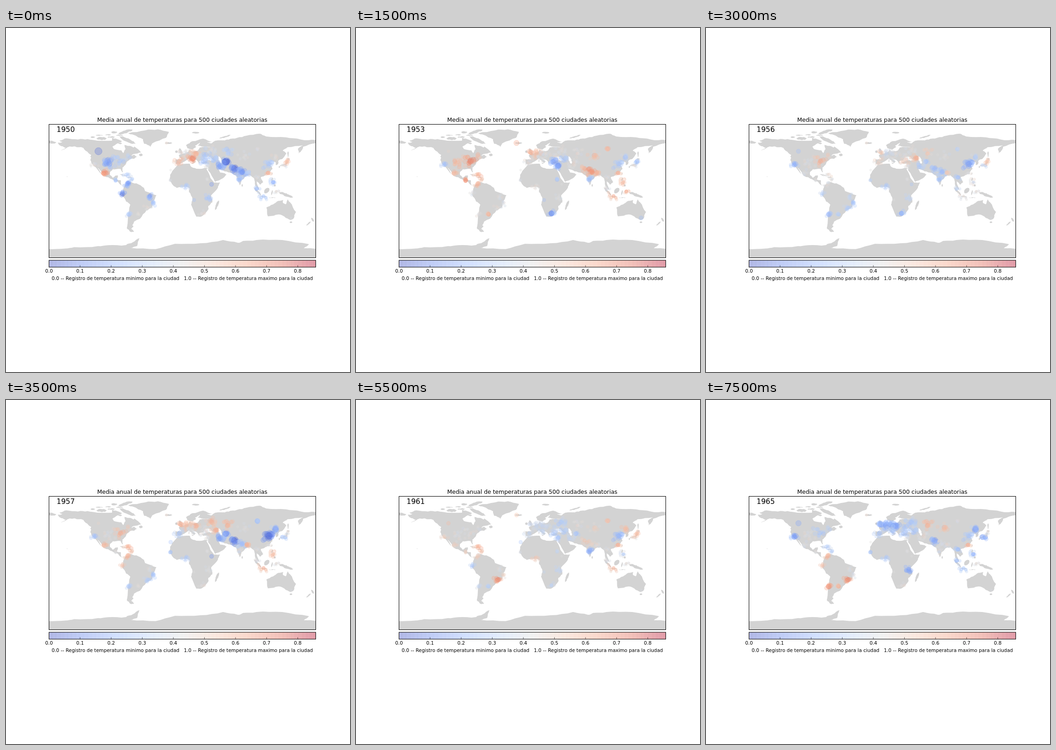
Animation of 748 by 748 pixels, one loop 8000 ms. Source, as an HTML page:

```html
<!DOCTYPE html>
<html lang="es">
<head>
<meta charset="utf-8">
<title>Media anual de temperaturas</title>
<style>
html, body { margin: 0; width: 100%; height: 100%; overflow: hidden; background: #fff; }
svg { display: block; width: 100%; height: 100%; }
text { font: 10.39px "DejaVu Sans", sans-serif; white-space: pre; }
#title { font-size: 12.47px; }
#year { font-size: 15.58px; }
.mid text, .mid { text-anchor: middle; }
.frame { fill: none; stroke: #000; stroke-width: 1.04; }
</style>
</head>
<body>
<svg viewBox="0 0 748 748">
  <clipPath id="box"><rect x="93.5" y="209.5" width="580" height="290"/></clipPath>
  <g clip-path="url(#box)">
    <g id="land" fill="#d3d3d3" transform="translate(383.4 354.8) scale(1.6103 -1.6103)"></g>
    <g id="dots" fill-opacity=".3" stroke-opacity=".3"></g>
  </g>
  <rect class="frame" x="93.5" y="209.5" width="580" height="290"/>
  <g id="bar"></g>
  <rect class="frame" x="93.5" y="505" width="580" height="15"/>
  <g id="ticks" class="mid"></g>
  <text id="title" class="mid" x="383.3" y="204">Media anual de temperaturas para 500 ciudades aleatorias</text>
  <text id="year" x="110" y="226">1950</text>
  <text class="mid" x="383.3" y="548">0.0 -- Registro de temperatura minimo para la ciudad   1.0 -- Registro de temperatura maximo para la ciudad</text>
</svg>
<script>
const $ = id => document.getElementById(id);

function add(parent, tag, attrs) {
  const el = document.createElementNS("http://www.w3.org/2000/svg", tag);
  for (const k in attrs) el.setAttribute(k, attrs[k]);
  return parent.appendChild(el);
}

let seed = 7;
const rnd = () => (seed = seed * 16807 % 2147483647) / 2147483647;
const bell = () => (rnd() + rnd() + rnd() - 1.5) * 1.9;

// Breaks every edge in two with a small sideways shift, as a coast does
function rough(pts, depth = 2) {
  if (!depth) return pts;
  const out = pts.flatMap(([x, y], i) => {
    const [u, v] = pts[(i + 1) % pts.length], dx = u - x, dy = v - y;
    const k = (rnd() - .5) * .25 * Math.min(1, 5 / Math.hypot(dx, dy));
    return [[x, y], [(x + u) / 2 - dy * k, (y + v) / 2 + dx * k]];
  });
  return rough(out, depth - 1);
}
const shape = (pts, fill = "#d3d3d3") => add($("land"), "polygon", { points: rough(pts).join(" "), fill });

// Coasts from a few capes and bays, as "longitude,latitude"
const coast = s => shape(s.split(" ").map(p => p.split(",").map(Number)));

// Islands: centre, half length as a vector, half width
const isle = ([lon, lat, dx, dy, w], fill) => {
  const len = Math.hypot(dx, dy) || w, ux = dx / len, uy = dy / len;
  shape([...Array(8).keys()].map(i => {
    const c = Math.cos(i * Math.PI / 4) * len, s = Math.sin(i * Math.PI / 4) * w;
    return [lon + ux * c - uy * s, lat + uy * c + ux * s];
  }), fill);
};

// North America: north, then south
coast("-168,65.6 -162,66.5 -166,68.3 -156.5,71.3 -141,69.7 -128,70.3 -115,68.2 -95,68.2 -94.5,72 -85.5,69.5 -81.5,67.5 -87.5,64.5 -94.5,60 -92.5,57 -82.3,55.2 -79.8,51.3 -76.7,56.7 -78,62.4 -70,61 -66,58.8 -64.5,60.3 -55.8,52.3 -66,50.2 -70,46 -124,46 -123,49 -130.5,54.5 -134,58.5 -145,60.4 -152,60.5 -164.5,54.6 -157.5,58.7 -165.5,62");
coast("-123,49 -95,50 -70,47.5 -65,49.2 -60.5,46.5 -66,43.6 -70.5,43.5 -76,37 -81,31.7 -80.5,25.2 -83.5,30 -94,29.5 -97.5,26 -97.5,21.5 -94,18.1 -90.3,21 -87,21.4 -88.5,15.8 -83.3,15 -83,9 -77.2,8.3 -83,8.3 -87.6,13 -95,16.1 -105.5,20.5 -109,25.7 -114.7,31.5 -109.5,23 -117,32.3 -122.5,37.5 -124.3,42");
coast("-73,78.3 -50,82.2 -33,83.5 -18,80 -22,72 -40,65 -43,60 -51.5,64 -53,70 -66,76.1");
coast("-77.5,8.6 -71.7,12 -62,10.6 -51.5,4.2 -50,0 -35,-5.5 -39,-13 -41,-22 -48.5,-26 -57,-37 -65,-41 -67.5,-46 -66,-48 -69,-51 -65.2,-54.8 -70,-55 -75,-50 -73.5,-37 -70.3,-18.3 -76,-14 -81.2,-5 -80,1");
// Europe: north, then south
coast("60,68.5 44,68 40,64.7 33,66.6 41,66.7 28,71 14,67.5 5,62 7,58 12.7,56 18.8,60 17.3,61.5 24,65.8 21.3,61.5 30,60 60,57");
coast("60,61 28,59.8 23.5,59 21,55 10.8,54 10.6,57.5 8.6,53.8 1.6,50.8 -4.7,48.4 -1.4,43.4 -9,43.2 -8.8,37 -5.5,36 0,38.7 9,44.3 16,38 18,40.3 12.3,45 19.5,41.8 22.5,36.6 23,40.5 28.5,41.5 31,46.5 37.5,46 41.5,42 50,40 60,48");
// Asia: north, then south
coast("58,69 67,71 74,72 87,75 104,77.7 113,74 140,72.7 160,69.7 180,69 180,65 163,60 162,56 157,51 156,57 163,62 142,59.3 135.5,54.7 140.5,51 135,43.5 129.5,41 129,36 126.5,35 126,39 121.8,40.5 118,39 122,37 119.3,35 121.8,30 117,23.5 108,21 100,25 75,40 52,42 50,55");
coast("26.5,39.5 35,42 42,41.5 52,45 75,45 110,35 112,21.7 106,19 109,12 105,8.7 100.5,13.4 104,1.4 98.3,8 97,17 92,21.5 87,21 80,15 77.5,8 72.8,21 67,24.7 57,26.8 48.5,30 51.5,25 55,24.5 59.7,22.5 55,17.5 44,12.8 35,28 36,36.5 27.5,37");
isle([51, 42, -2, 5, 2], "#fff");
coast("-182,69 -170,66.2 -173,64.3 -182,65");
coast("-6,35.8 10,37.2 11,34 19,30.3 34,31.2 32.7,29.5 37.3,20.5 43,11.5 51,11.8 48,4.5 39,-5.5 40.5,-15 35,-20 35.5,-24 27,-33.5 19,-34.5 11.8,-18 13.7,-11 9,-1 9.7,3.5 4.3,6.3 -7.5,4.4 -13,8.5 -17,14.7 -16.5,22 -9.8,31.4");
coast("113.5,-22 115.5,-34 124,-33 131,-31.5 138,-34.5 146.3,-39 150,-37.3 153.5,-28 145.5,-15 142.5,-10.8 140,-17.5 135.5,-15 136.5,-12 130,-13 122.3,-18");
coast("-182,-95 -182,-78.2 -158,-77.5 -146,-75.6 -114,-74.2 -100,-73 -76,-72.8 -67,-69 -58,-63.5 -61,-74 -70,-76.5 -36,-78.2 -10,-71 25,-70.3 55,-66 75,-69.7 82,-67.2 100,-66 135,-66 171,-71.5 164,-77 182,-78 182,-95");

[[-74, 69, 11, -5, 2.5], [-109, 71, 7, 0, 2], [-121, 73, 3, 0, 1.2], [-77, 80, 10, 3, 2], [-92, 79.5, 4, 0, 1.5],
  [-85, 75.3, 5, 0, .7], [-112, 75.5, 5, 0, .7], [-96, 73, 5, 0, 1], [-100, 76, 4, 0, .7], [-84, 64.5, 2.5, 0, 1],
  [-56, 49, 2.5, 0, 1.8], [-18.5, 65, 5, 0, 1.3], [-79.5, 21.6, 5, -1.3, .5], [-71.3, 18.8, 3, 0, .7],
  [-155.5, 19.6, .5, 0, .4], [-2.3, 54, -1.7, 4, 1.8], [-8, 53.3, 0, 1.8, 1.6], [14, 37.5, 1.4, 0, .6],
  [9, 40.8, 0, 2, .5], [18, 79, 5, 0, 1.2]].forEach(i => isle(i));
[[58, 73.7, 8, 2.5, .9], [142.8, 50, 0, 4, .8], [143, 43.4, 2, 0, 1.1], [136, 35.2, 4.5, 1.2, .8],
  [140.7, 38.3, .6, 3, .8], [131, 32.7, 0, 1.4, .8], [121, 23.7, .5, 1.5, .5], [80.8, 7.8, 0, 1.8, .8],
  [101.5, -.3, 5, -5.5, 1.2], [110, -7.3, 4.7, -.8, .6], [114, .8, 3, 3.5, 2.8], [121, -2, .7, 3.5, .8],
  [121.3, 16, .5, 2.5, 1], [124.8, 7.8, 1.5, 0, 1.5], [121, -8.8, 5, 0, .4], [46.8, -19, 2.5, 6.5, 1.6],
  [140, -5, 9.5, -3.5, 2.2], [146.7, -42, 1.8, 0, 1.2], [175.8, -38.5, 1.6, -2.6, 1.2],
  [170.5, -43.7, 3, 2.7, .9]].forEach(i => isle(i));

const stops = [[59, 76, 192], [98, 130, 234], [141, 176, 254], [184, 208, 249], [221, 221, 221],
  [245, 196, 173], [244, 154, 123], [222, 96, 77], [180, 4, 38]];
function color(v) {
  const p = v * 8, i = Math.min(7, Math.floor(p));
  return `rgb(${stops[i].map((c, k) => Math.round(c + (stops[i + 1][k] - c) * (p - i)))})`;
}

// Colour scale: overlapping translucent slices give the fine stripes
const barX = 93.5, barW = 580;
for (let i = 0; i < 256; i++)
  add($("bar"), "rect", { x: barX + i * barW / 256, y: 505, width: Math.min(2.9, barW - i * barW / 256),
    height: 15, fill: color(i / 255), "fill-opacity": .33 });
for (let i = 0; i < 9; i++) {
  const x = barX + i * 67.6;
  add($("ticks"), "path", { d: `M${x} 520v-4.2`, stroke: "#000", "stroke-width": .6 });
  add($("ticks"), "text", { x, y: 532 }).textContent = (i / 10).toFixed(1);
}

// Regions: centre on the stage and reach; the reach sets how many cities they hold
const regions = {
  canada: [201, 268, 0], plains: [222, 292, 8], east: [250, 288, 8], california: [193, 298, 4], mexico: [216, 314, 5],
  isthmus: [238, 331, 2], antilles: [265, 322, 6], colombia: [264, 340, 5], peru: [254, 361, 3], brazil: [313, 365, 4],
  bahia: [319, 380, 3], rio: [309, 391, 4], plata: [288, 405, 2], chile: [268, 406, 3], iceland: [349, 250, 0],
  britain: [381, 270, 3], france: [393, 273, 6], germany: [412, 272, 6], italy: [404, 284, 5], iberia: [376, 290, 5],
  ukraine: [435, 275, 8], moscow: [447, 265, 6], turkey: [432, 292, 6], levant: [439, 300, 4], caucasus: [454, 284, 5]
};
Object.assign(regions, {
  canaries: [358, 309, 0], senegal: [358, 331, 1], guinea: [390, 343, 5], nile: [437, 330, 2], horn: [447, 340, 0],
  congo: [409, 374, 0], kenya: [441, 371, 5], cape: [425, 403, 4],
  iran: [466, 299, 6], turkestan: [478, 291, 4], urals: [483, 268, 6], indus: [497, 307, 5], ganges: [512, 311, 7],
  deccan: [509, 327, 5], bengal: [525, 317, 4], siberia: [518, 277, 5], lena: [547, 263, 2], china: [570, 296, 7],
  canton: [569, 315, 3], manchuria: [585, 281, 4], korea: [602, 298, 3], japan: [610, 291, 3], indochina: [547, 324, 4],
  luzon: [581, 335, 5], java: [560, 366, 5], malaya: [546, 349, 3], celebes: [588, 355, 3], australia: [620, 413, 0]
});

const cities = Object.entries(regions).flatMap(([region, [x, y, r]]) =>
  Array.from({ length: 1 + Math.round(r * 2) }, (_, i) => {
    const u = i ? bell() : 0, v = i ? bell() : 0;
    const cx = x + u * r * 1.1, cy = y + v * r * .85;
    return { region, y: cy, gain: 1.1 - .25 * Math.min(2, Math.hypot(u, v)), jit: bell() * .03,
      el: add($("dots"), "circle", { cx, cy }) };
  }));

// Which regions ran warm or cold in a year
const level = { hot: .29, warm: .17, cool: -.17, cold: -.3, icy: -.43 };
const years = {
  1950: { hot: "mexico italy", warm: "iberia germany canton japan",
    cool: "east antilles isthmus bahia chile ukraine urals turkey caucasus china luzon java malaya bengal deccan guinea kenya congo",
    cold: "plains colombia brazil iran ganges horn", icy: "canada peru turkestan indus" },
  1953: { hot: "east isthmus ganges",
    warm: "plains mexico antilles colombia plata iceland britain france indus bengal siberia lena canton luzon java celebes",
    cool: "california nile caucasus congo china manchuria japan deccan australia", cold: "turkey levant cape" },
  1955: { hot: "iberia japan", warm: "east turkey caucasus canaries",
    cool: "mexico antilles colombia brazil bahia rio germany moscow ganges china luzon java malaya guinea kenya",
    cold: "california france plata chile deccan indochina", icy: "canada peru cape" },
  1957: { warm: "east mexico antilles colombia peru britain france germany moscow urals caucasus bengal java luzon",
    cool: "california iberia canaries senegal guinea rio bahia chile ganges korea lena",
    cold: "iran turkestan horn manchuria", icy: "indus china" },
  1959: { hot: "california britain france rio java korea manchuria",
    warm: "east antilles isthmus iceland germany bahia ganges canton japan luzon",
    cool: "plains peru chile senegal nile deccan urals iran china cape",
    cold: "canaries turkey levant caucasus turkestan plata" },
  1963: { hot: "rio lena", warm: "canada plains mexico antilles colombia guinea senegal indus siberia urals canton japan",
    cool: "east california peru ukraine italy iberia korea kenya congo",
    cold: "germany moscow deccan china luzon", icy: "britain france" },
  1965: { hot: "rio chile", warm: "peru colombia plata urals siberia canton",
    cool: "east antilles iberia italy moscow ukraine turkey caucasus senegal guinea luzon java malaya indochina china",
    cold: "canada california britain france germany kenya manchuria korea indus" }
};

const known = Object.keys(years).map(Number);
function mood(region, year) {
  const word = Object.keys(years[year]).find(k => years[year][k].split(" ").includes(region));
  return word ? level[word] : 0;
}

// Years without an entry lie between their neighbours
function anomaly(region, year) {
  const i = known.findIndex(y => y >= year), b = known[i];
  if (b === year) return mood(region, b);
  const a = known[i - 1], t = (year - a) / (b - a);
  return mood(region, a) * (1 - t) + mood(region, b) * t;
}

function show(year) {
  $("year").textContent = year;
  for (const c of cities) {
    const v = Math.max(.02, Math.min(.84, .5 + c.jit + c.gain * anomaly(c.region, year)));
    const lat = Math.abs(354.8 - c.y) / 1.61, paint = color(v);
    c.el.setAttribute("r", (2.4 + Math.abs(v - .5) * (5 + lat * .15)).toFixed(2));
    c.el.setAttribute("fill", paint);
    c.el.setAttribute("stroke", paint);
  }
}

let shown = 0;
const start = performance.now();
function tick() {
  const year = 1950 + Math.floor((performance.now() - start) / 500) % 16;
  if (year !== shown) show(shown = year);
  requestAnimationFrame(tick);
}
tick();
</script>
</body>
</html>
```
